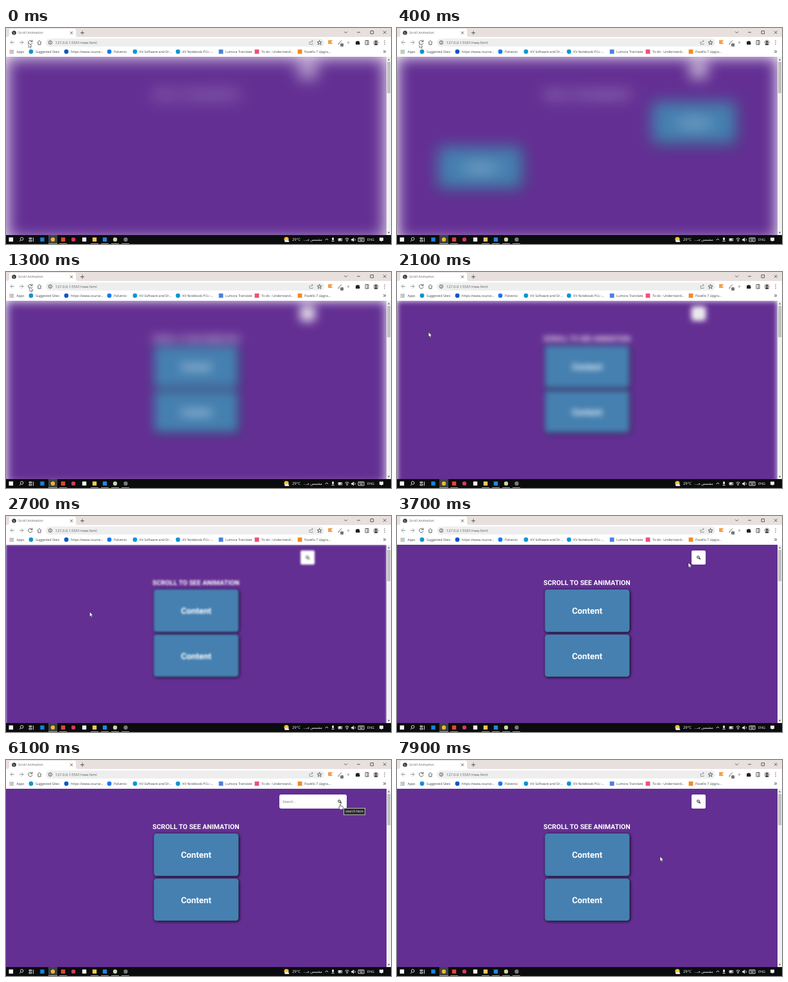
An HTML page that plays this animation: 600x338 px, repeating every 8 s.

```html
<!DOCTYPE html>
<html lang="en">
<head>
<meta charset="utf-8">
<title>Scroll Animation</title>
<style>
html, body { margin: 0; width: 100%; height: 100%; overflow: hidden; background: #fff; }
svg { display: block; width: 600px; height: 338px; text-rendering: geometricPrecision; }
text { font-family: "Open Sans", "Noto Sans", sans-serif; font-size: 5.1px; fill: #3c4043; white-space: pre; }
.line { fill: none; stroke: #4a4d51; stroke-width: .9; }
.pale { fill: none; stroke: #eee; stroke-width: .9; }
.head { font: bold 10.5px Roboto, sans-serif; fill: #fff; text-anchor: middle; }
.big { font-size: 13.3px; }
.box { fill: #4580b0; filter: drop-shadow(1px 1px 2px rgba(0, 0, 0, .95)); }
.task text { fill: #fff; }
</style>
</head>
<body>
<svg viewBox="0 0 600 338">
  <defs>
    <clipPath id="view"><path d="M0 45H593V324H0Z"/></clipPath>
    <g id="lens" fill="none" stroke="#111">
      <circle cx="-.6" cy="-.6" r="1.75" stroke-width="1"/><path d="M.8 .8L2.7 2.7" stroke-width="1.3"/>
    </g>
  </defs>

  <!-- page, a little taller than the window -->
  <g clip-path="url(#view)">
    <path fill="#fff" d="M0 45H593V324H0Z"/>
    <g id="page">
      <path fill="#632f93" d="M0 45H593V334H0Z"/>
      <text class="head" x="296" y="108">SCROLL TO SEE ANIMATION</text>
      <g id="upper"><rect class="box" x="230.5" y="115" width="132" height="66.5" rx="4.5"/><text class="head big" x="296.3" y="153.2">Content</text></g>
      <g id="lower"><rect class="box" x="230.5" y="185.5" width="132" height="66" rx="4.5"/><text class="head big" x="296.3" y="223.6">Content</text></g>
      <rect id="field" y="54" height="22" rx="3" fill="#fff"/>
      <text id="hint" y="67" style="font:5.2px 'Liberation Sans',sans-serif;fill:#757575">Search...</text>
      <g id="button"><rect x="-11" y="-11" width="22" height="22" rx="3" fill="#fff"/><use href="#lens"/></g>
    </g>
  </g>

  <!-- browser frame -->
  <path fill="#e7e0dd" d="M0 0H600V14H0Z"/>
  <path fill="#fff" d="M0 14H600V45H0Z"/>
  <path fill="#fff" d="M2 14Q5 14 5 11V4Q5 1 8 1H106Q109 1 109 4V11Q109 14 112 14Z"/>
  <circle cx="12.5" cy="7.5" r="3.3" fill="#35383c"/>
  <path d="M10.5 6L13 8L12 10" fill="none" stroke="#ddd" stroke-width=".8"/>
  <text x="19" y="9.3" style="fill:#5c5f63">Scroll Animation</text>
  <path class="line" d="M100 5.5L104 9.5M104 5.5L100 9.5M116 7.5H122M119 4.5V10.5M527 5.5L529.5 8L532 5.5M547 6.8H552M568 4.5H572.5V9H568ZM588 4.5L592.5 9M592.5 4.5L588 9"/>
  <path class="line" d="M40.3 20.5A3.2 3.2 0 1 0 41 23.5M41 18.7V21.5H38M49 22.5L52 19.5L55 22.5M50 22V26H54V22"/>
  <path class="line" style="stroke:#8c8f93" d="M13 22.5H7M10 19.5L7 22.5L10 25.5M21 22.5H27M24 19.5L27 22.5L24 25.5"/>
  <rect x="62" y="16.5" width="434" height="12.5" rx="6.2" fill="#eeeeee"/>
  <circle class="line" cx="69" cy="22.7" r="2.7"/><path class="line" d="M69 22.3V24.3M69 20.8V21.5"/>
  <text x="77" y="24.9" style="font-size:5.65px;fill:#5c5f63">127.0.0.1:5501/new.html</text>
  <path class="line" style="stroke:#8c8f93" d="M473 21V25.5H478V24M474.5 23Q475 20.5 478 20.5M476.5 19L478.3 20.5L476.5 22"/>
  <path class="line" d="M488.5 19.3L489.4 21.8L492 21.9L489.9 23.5L490.7 26L488.5 24.5L486.3 26L487.1 23.5L485 21.9L487.6 21.8Z"/>
  <path fill="#f5a04e" d="M502 19H509L507 22L509 25H502Z"/>
  <path class="line" d="M518 24.5L523 19.5M517.5 25.5L519.5 25"/>
  <rect x="521" y="24" width="5" height="5" rx="1" fill="#777"/>
  <path fill="#a5a5a5" d="M532.5 20.5L535.5 22.7L532.5 25Z"/>
  <path fill="#222" d="M545 21H547A1.4 1.4 0 0 1 549.6 21H551V23.2A1.3 1.3 0 0 1 551 25.5V26H545Z"/>
  <path class="line" d="M560 19.5H565V26H560ZM563 19.5V26"/>
  <circle cx="576.5" cy="22.7" r="4.2" fill="#b8b4b2"/>
  <path fill="#333" d="M573.5 26.5Q576.5 21 579.5 26.5ZM575 21.5A1.5 1.5 0 1 1 578 21.5A1.5 1.5 0 1 1 575 21.5"/>
  <g fill="#555"><circle cx="590" cy="20" r=".7"/><circle cx="590" cy="22.7" r=".7"/><circle cx="590" cy="25.4" r=".7"/></g>
  <g id="bookmarks"></g>
  <path class="line" d="M588 35L590 37L588 39M590 35L592 37L590 39"/>

  <!-- scrollbar -->
  <path fill="#f1f1f1" d="M593 45H600V324H593Z"/>
  <path fill="#c1c1c1" d="M594 53H599V102H594Z"/>
  <path fill="#555" d="M594.8 50.5L596.5 48.3L598.2 50.5ZM594.8 319.2L596.5 321.4L598.2 319.2Z"/>

  <!-- taskbar -->
  <g class="task">
    <path fill="#0b0c0e" d="M0 324H600V338H0Z"/>
    <path fill="#3f4245" d="M66 324H80V337H66Z"/>
    <path fill="#6fa8d8" d="M66 337H80V338H66ZM83 337H95V338H83ZM132 337H144V338H132ZM148 337H160V338H148ZM164 337H176V338H164ZM180 337H192V338H180Z"/>
    <rect x="4.5" y="327.7" width="6.6" height="6.6" fill="#fff"/>
    <path class="pale" d="M27 330A2.3 2.3 0 1 1 22.4 330A2.3 2.3 0 1 1 27 330M23 332L21 334M36 328.5H40V330H36ZM36 332H40V334H36ZM42.5 328V334.5"/>
    <g id="apps"></g>
    <circle cx="437" cy="330.5" r="3.6" fill="#fbc02d"/>
    <path fill="#dfe8f0" d="M435 335A1.6 1.6 0 0 1 436.5 332A2 2 0 0 1 440 332.5A1.3 1.3 0 0 1 440.5 335Z"/>
    <text x="446" y="333.2" style="font-size:5.9px">29°C</text>
    <text x="478" y="333" text-anchor="middle" direction="rtl" style="font-size:5.6px">مشمس جـ...</text>
    <path class="pale" d="M497.5 332L499.8 329.7L502 332M518 329.5H523.5V333H518ZM528.5 330Q531.5 327.3 534.5 330M529.7 331.7Q531.5 330 533.3 331.7M543.5 329.5Q545 331 543.5 333M549 328.5H558V334H549ZM550.5 330.3H556.5M551.5 332.3H555.5"/>
    <path fill="#eee" d="M508.2 328H510.8V332H508.2ZM507.5 333H511.5V334H507.5ZM518.5 330H522V332.5H518.5ZM530.7 332.5H532.3V334H530.7ZM538 330.2H539.5L542 328V334.5L539.5 332.6H538ZM582 328H588V333H586L585 334.5L584 333H582Z"/>
    <text x="563" y="333" style="font-size:5.4px">ENG</text>
  </g>

  <g id="tip">
    <rect x="526.4" y="75.4" width="33.2" height="10.4" fill="#2b2b2b" stroke="#ddd" stroke-width=".8"/>
    <text x="529" y="82.3" style="fill:#fff">search here</text>
  </g>
  <g id="arrow"><path d="M0 0V7.5L1.7 5.9L2.9 8.6L4.1 8L3 5.5H5.3Z" fill="#fff" stroke="#222" stroke-width=".5"/></g>
  <g id="hand"><path d="M-.8 .5Q0 -.6 .8 .5V3L4 3.7Q4.7 4 4.5 5L3.8 8.5H-.3L-2.8 5Q-2.3 4 -.8 5Z" fill="#fff" stroke="#222" stroke-width=".6"/></g>
</svg>
<script>
const el = id => document.getElementById(id);
const dot = (x, y, r, color) => `<circle cx="${x}" cy="${y}" r="${r}" fill="${color}"/>`;
const square = (x, y, r, color) => `<rect x="${x - r}" y="${y - r}" width="${2 * r}" height="${2 * r}" fill="${color}"/>`;

let grid = '';
for (let i = 0; i < 9; i++)
  grid += square(6.5 + i % 3 * 2.2, 35 + Math.floor(i / 3) * 2.2, .7, ['#e05040', '#4a9a55', '#4080e0'][i % 3]);
el('bookmarks').innerHTML = grid + [
  [16.5, 'Apps'],
  [46, 'Suggested Sites', dot, '#168fd0'],
  [101, 'https://www.course...', dot, '#0b56c9'],
  [168, 'Palvenio', dot, '#1877f2'],
  [208, 'KV Software and Dr...', dot, '#0a96d6'],
  [275, 'KV Notebook PCs -...', dot, '#0a96d6'],
  [342, 'Lumora Translate', square, '#4a80e0'],
  [398, 'To do - Understand...', square, '#f04f78'],
  [465, 'Pavello 7 Upgra...', square, '#f28a24']
].map(([x, label, icon, color]) =>
  (icon ? icon(x - 7, 37, 3.4, color) : '') + `<text x="${x}" y="38.9">${label}</text>`).join('');

el('apps').innerHTML = [
  [56.5, square, '#1683d8'], [73, dot, '#e8b83a'], [89, square, '#d94a35'], [105, dot, '#d33a5e'],
  [122, square, '#f2f2f2'], [138, square, '#f3c75a'], [154, square, '#2389d7'],
  [170, dot, '#c8d7a8'], [186.5, dot, '#77797c']
].map(([x, icon, color]) => icon(x, 331, 3.2, color)).join('');

const LOOP = 8000, SHARP_AT = 3100, OPEN_AT = 4650, CLOSE_AT = 6700;
const clamp = v => Math.min(1, Math.max(0, v));
const mix = (a, b, p) => a + (b - a) * p;

// CSS "ease": cubic-bezier(.25, .1, .25, 1)
function ease(p) {
  p = clamp(p);
  let lo = 0, hi = 1;
  const curve = (a, b, s) => 3 * a * s * (1 - s) ** 2 + 3 * b * s * s * (1 - s) + s ** 3;
  for (let i = 0; i < 20; i++) {
    const mid = (lo + hi) / 2;
    if (curve(.25, .25, mid) < p) lo = mid; else hi = mid;
  }
  return curve(.1, 1, lo);
}

// time, x, y of the pointer tip
const pointer = [
  [0, 35, 23], [700, 35, 24], [1300, 37, 23], [1700, 38, 25], [2100, 49, 94], [2700, 130, 150],
  [3200, 300, 130], [3700, 454, 73], [4200, 470, 67], [4750, 470, 67], [5300, 521, 69],
  [6100, 521, 69], [6800, 521, 69], [7500, 420, 140], [7900, 410, 151], [8000, 410, 151]
];
function pointerAt(t) {
  const i = pointer.findIndex(k => k[0] > t);
  const [t0, x0, y0] = pointer[i - 1], [t1, x1, y1] = pointer[i];
  const p = (t - t0) / (t1 - t0);
  return [mix(x0, x1, p), mix(y0, y1, p)];
}

const move = (id, x, y) => el(id).setAttribute('transform', `translate(${x} ${y})`);
const show = (id, on) => el(id).style.display = on ? '' : 'none';

function draw(t) {
  const blur = 13.5 * clamp(1 - t / SHARP_AT);
  el('page').style.filter = blur ? `blur(${blur}px)` : 'none';

  const slide = 528 * (1 - ease((t - 100) / 750));
  move('upper', slide, 0);
  move('lower', -slide, 0);

  const open = ease((t - OPEN_AT) / 300) - ease((t - CLOSE_AT) / 300);
  const left = mix(459, 426, open), buttonX = left + 11 + 83 * open;
  el('field').setAttribute('x', left);
  el('field').setAttribute('width', mix(22, 88, open));
  el('hint').setAttribute('x', left + 5);
  show('hint', open > .3);
  move('button', buttonX, 65);
  show('tip', t >= 5800 && t < CLOSE_AT);

  const [x, y] = pointerAt(t);
  const over = Math.abs(x - buttonX) < 11 && Math.abs(y - 65) < 11;
  show('hand', over);
  show('arrow', !over);
  move(over ? 'hand' : 'arrow', x, y);
}

function tick() {
  draw(performance.now() % LOOP);
  requestAnimationFrame(tick);
}
tick();
</script>
</body>
</html>
```
